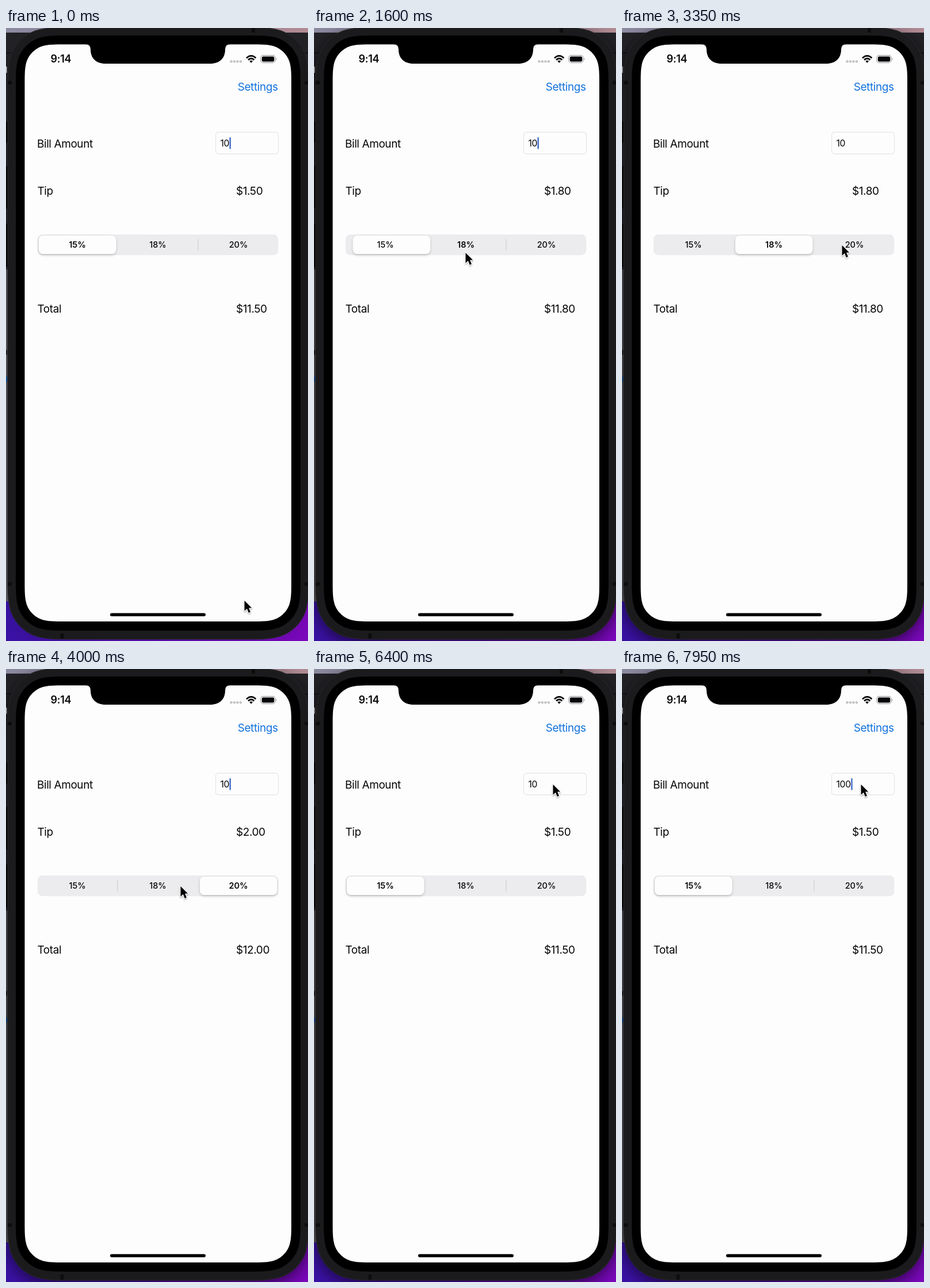
These frames come from a looping animation (525 by 1066 pixels, 8000 ms). An HTML page:

```html
<!DOCTYPE html>
<html lang="en">
<head>
<meta charset="utf-8">
<title>Tip calculator</title>
<style>
html, body { margin: 0; width: 100%; height: 100%; overflow: hidden; background: #17171a; }
svg { display: block; width: 100%; height: 100%; }
text { font-family: Inter, "Liberation Sans", sans-serif; fill: #060608; }
.label { font-size: 19px; letter-spacing: -.42px; }
.tab { font-size: 14.5px; font-weight: 500; text-anchor: middle; }
.field { font-size: 15.7px; letter-spacing: -.3px; }
</style>
</head>
<body>
<svg viewBox="0 0 525 1066">
  <defs>
    <linearGradient id="sky">
      <stop offset="0" stop-color="#8b8a9f"/>
      <stop offset=".5" stop-color="#a58fae"/>
      <stop offset="1" stop-color="#b18b92"/>
    </linearGradient>
    <linearGradient id="floor">
      <stop offset="0" stop-color="#3912a4"/>
      <stop offset="1" stop-color="#7c08bd"/>
    </linearGradient>
    <filter id="soft" x="-20%" y="-10%" width="140%" height="120%">
      <feGaussianBlur stdDeviation="14"/>
    </filter>
    <filter id="pillShadow" x="-10%" y="-30%" width="120%" height="170%">
      <feDropShadow dx="0" dy="2" stdDeviation="2" flood-opacity=".22"/>
    </filter>
    <filter id="arrowShadow" x="-50%" y="-30%" width="200%" height="170%">
      <feDropShadow dx="0" dy="1.5" stdDeviation="1.3" flood-opacity=".35"/>
    </filter>
  </defs>

  <!-- desktop behind the phone -->
  <rect width="525" height="1066" fill="#222227"/>
  <rect width="525" height="8" fill="url(#sky)"/>
  <path d="M0 43.5H525" stroke="#09090b"/>
  <rect y="420" width="5" height="577" fill="#59595d"/>
  <rect y="560" width="2" height="8" fill="#222"/>
  <rect y="606" width="2" height="9" fill="#11539a"/>
  <rect y="67" width="1.5" height="11" fill="#ccc"/>
  <rect y="997" width="525" height="69" fill="url(#floor)"/>
  <path id="shade" filter="url(#soft)"/>
  <path d="M1.5 163V199M1.5 240V314M1.5 340V415" stroke="#060607" stroke-width="3"/>

  <!-- phone body -->
  <path id="body" fill="#1b1b1d" stroke="#262629" stroke-width="1.2"/>
  <path d="M97.5 1053V1062M430 0V8M3 95H10M519 95H526M3 967H10M519 967H526" stroke="#0d0d0e" stroke-width="6"/>
  <path id="bezel"/>
  <path id="screen" fill="#fefdfe"/>
  <path d="M138 28Q147 28.5 147 37C147 53 157 62 173 62H355C371 62 381 53 381 37Q381 28.5 390 28Z" fill="#000"/>
  <rect x="181" y="1017.5" width="166" height="5.5" rx="2.75" fill="#000"/>

  <!-- status bar -->
  <text x="77.5" y="60" font-size="18" font-weight="600" letter-spacing="-.3">9:14</text>
  <g fill="#c4c4c7">
    <circle cx="391.4" cy="58.3" r="2.3"/><circle cx="396.9" cy="58.3" r="2.3"/>
    <circle cx="402.4" cy="58.3" r="2.3"/><circle cx="407.9" cy="58.3" r="2.3"/>
  </g>
  <g fill="none" stroke="#060608" stroke-width="2.7">
    <path d="M418 52.2Q426.2 44.6 434.4 52.2"/>
    <path d="M421 55.4Q426.2 50.6 431.4 55.4"/>
  </g>
  <path d="M423.3 57.6Q426.2 55.2 429.1 57.6L426.2 60.7Z" fill="#060608"/>
  <rect x="442.9" y="47.6" width="25" height="12.8" rx="4" fill="none" stroke="#9a9a9c" stroke-width="1.1"/>
  <rect x="444.8" y="49.4" width="21.4" height="9.2" rx="2.4" fill="#060608"/>
  <path d="M469.4 51.8Q471.8 54 469.4 56.2Z" fill="#9a9a9c"/>

  <!-- form -->
  <text class="label" x="402.7" y="109.4" style="fill:#1272dc">Settings</text>
  <text class="label" x="54" y="207.5">Bill Amount</text>
  <text class="label" x="54.5" y="289.5">Tip</text>
  <text class="label" x="54.5" y="494.5">Total</text>
  <text class="label" id="tip" x="400" y="289.5"></text>
  <text class="label" id="total" x="400" y="494.5"></text>
  <rect x="364.5" y="181.2" width="109" height="37.6" rx="5" fill="#fefdfe" stroke="#e4e4e7" stroke-width="1.2"/>
  <text class="field" id="bill" x="372.5" y="206"></text>
  <rect id="caret" y="190" width="2.3" height="20.5" rx="1" fill="#3563c9"/>

  <rect x="54.7" y="359" width="418.6" height="36" rx="8.5" fill="#ecebed"/>
  <path id="sepA" d="M194 367V387" stroke="#cfced2" stroke-width="1.2"/>
  <path id="sepB" d="M334 367V387" stroke="#cfced2" stroke-width="1.2"/>
  <rect id="pill" y="361" width="134.3" height="32" rx="7.5" fill="#fefdfe" filter="url(#pillShadow)"/>
  <text class="tab" x="124" y="382.3">15%</text>
  <text class="tab" x="264" y="382.3">18%</text>
  <text class="tab" x="404" y="382.3">20%</text>

  <path id="arrow" d="M.5 .8V18.8L4.9 14.8L7.8 22L11 20.6L8.1 13.6H13.2Z" fill="#000" stroke="#fff" stroke-width="2.2" stroke-linejoin="round" paint-order="stroke" filter="url(#arrowShadow)"/>
</svg>
<script>
const LOOP = 8000, SLIDE = 300;
const $ = id => document.getElementById(id);
const tabs = document.querySelectorAll(".tab");
const rates = [15, 18, 20];

// [time, selected tab]
const taps = [[-1000, 0], [1550, 1], [3450, 2], [4400, 1], [5700, 0]];
// [time, x, y] of the pointer tip
const route = [
  [0, 414, 995], [400, 414, 995], [1300, 263, 390], [2600, 263, 390],
  [3350, 382, 377], [3700, 384, 377], [4000, 303, 377], [4250, 262, 377],
  [5000, 262, 377], [5400, 164, 374], [5600, 132, 375], [5850, 132, 375],
  [6200, 433, 99], [6390, 415, 200], [LOOP, 415, 200]
];

const clamp = v => Math.max(0, Math.min(1, v));
const ease = v => (v = clamp(v), v * v * (3 - 2 * v));
const mix = (a, b, k) => a + (b - a) * k;

// Rectangle whose corners bend in gradually
function smoothRect(left, top, right, bottom, r) {
  const bend = [[0, 1.528], [0, 1.088], [0, .868], [.075, .631], [.169, .372],
    [.372, .169], [.631, .075], [.868, 0], [1.088, 0], [1.528, 0]];
  const corner = (x, y, sx, sy) => {
    const pts = bend.map(([u, v]) => [x + sx * u * r, y + sy * v * r]);
    if (sx !== sy) pts.reverse();
    return pts[0] + "C" + pts.slice(1).join(" ");
  };
  return "M" + corner(left, top, 1, 1) + "L" + corner(right, top, -1, 1) +
    "L" + corner(right, bottom, -1, -1) + "L" + corner(left, bottom, 1, -1) + "Z";
}

function pointer(t) {
  let i = 1;
  while (i < route.length - 1 && t > route[i][0]) i++;
  const [t0, x0, y0] = route[i - 1], [t1, x1, y1] = route[i];
  const k = ease((t - t0) / (t1 - t0));
  return [mix(x0, x1, k), mix(y0, y1, k)];
}

function caretAlpha(t) {
  const p = (t % 1000) / 1000;
  return p < .45 ? 1 - clamp((p - .08) / .14) : clamp((p - .45) / .13);
}

function draw(t) {
  let n = taps.length - 1;
  while (t < taps[n][0]) n--;
  const [start, now] = taps[n];
  const before = n ? taps[n - 1][1] : now;
  const k = ease((t - start) / SLIDE);

  $("pill").setAttribute("x", 57 + 140 * mix(before, now, k));
  $("sepA").setAttribute("opacity", mix(before === 2, now === 2, k));
  $("sepB").setAttribute("opacity", mix(before === 0, now === 0, k));
  tabs.forEach((tab, i) => tab.style.fontWeight = i === now ? 600 : 500);

  const tip = rates[now] / 10;
  $("tip").textContent = "$" + tip.toFixed(2);
  $("total").textContent = "$" + (10 + tip).toFixed(2);

  const typed = t >= 7850;
  $("bill").textContent = typed ? "100" : "10";
  $("caret").setAttribute("x", typed ? 398.3 : 388.5);
  $("caret").setAttribute("opacity", caretAlpha(t));
  $("shade").setAttribute("opacity", t < 900 ? .1 : .62);
  $("arrow").setAttribute("transform", `translate(${pointer(t)})`);
}

$("shade").setAttribute("d", smoothRect(3, 6, 526, 1070, 76));
$("body").setAttribute("d", smoothRect(3, -1, 526, 1063, 76));
$("bezel").setAttribute("d", smoothRect(17, 13, 512, 1048, 62));
$("screen").setAttribute("d", smoothRect(32.5, 28.5, 496, 1032, 46.5));

const begin = performance.now();
function tick() {
  draw((performance.now() - begin) % LOOP);
  requestAnimationFrame(tick);
}
tick();
</script>
</body>
</html>
```
